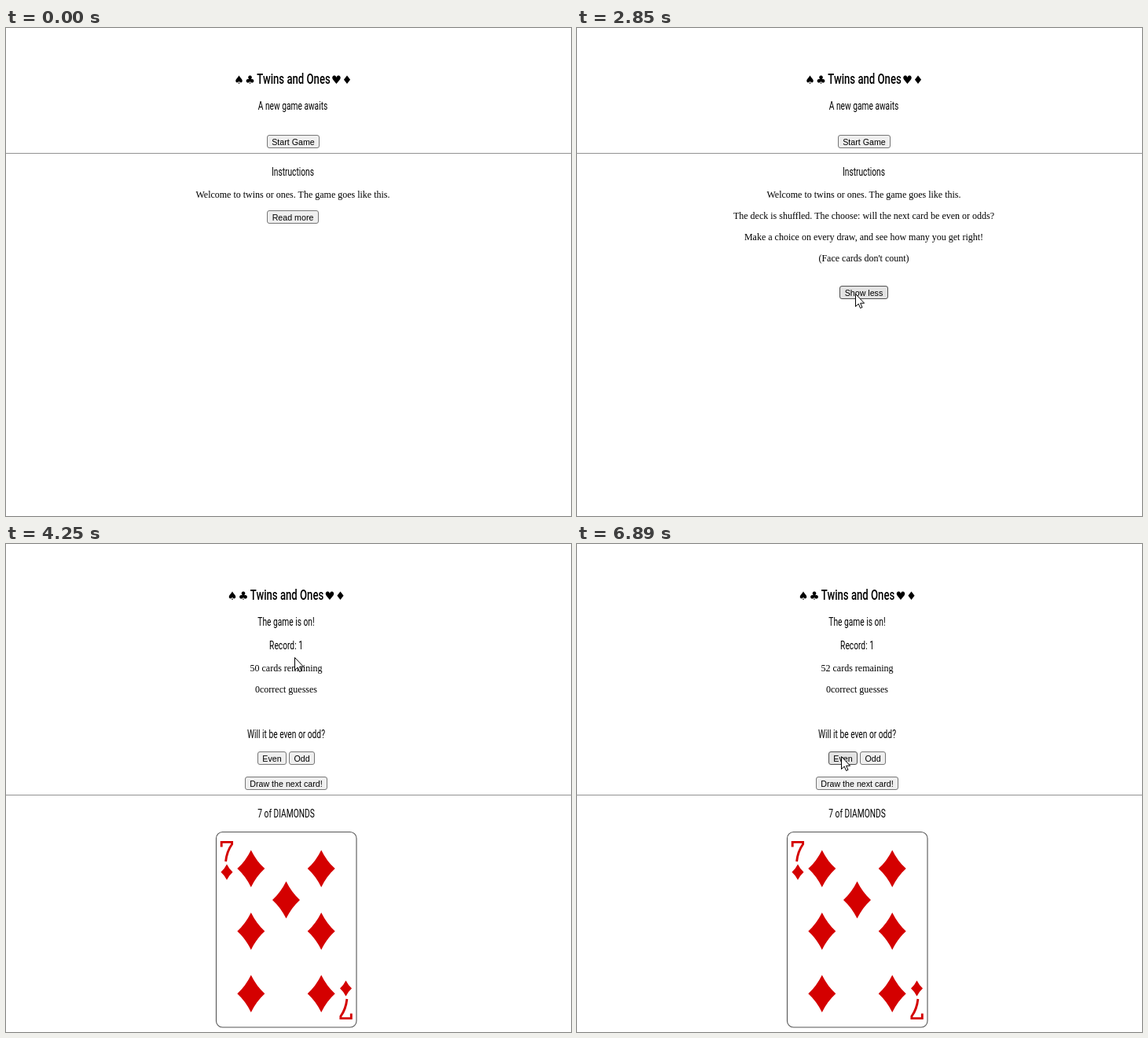
An HTML page that plays this animation: 719 by 621 pixels, repeating every 8 s.

```html
<!DOCTYPE html>
<html lang="en">
<head>
<meta charset="utf-8">
<title>Twins and Ones</title>
<style>
  html, body { margin: 0; width: 100%; height: 100%; overflow: hidden; background: #fff; }
  svg { display: block; width: 100%; height: 100%; }
  text { text-anchor: middle; }
  .head { font: 400 14px Roboto, sans-serif; }
  .big { font-size: 18px; font-weight: 500; }
  .suit { font: 14.5px "DejaVu Sans", sans-serif; }
  .body { font: 12px "Liberation Serif", serif; }
  .btn text { font: 10.67px "Liberation Sans", sans-serif; }
  .btn rect { fill: #efefef; stroke: #767676; }
  .btn.hover rect { fill: #e3e3e3; stroke: #4f4f4f; }
</style>
</head>
<body>
<svg id="stage" viewBox="0 0 719 621"></svg>
<script>
const LOOP = 8000, STEP = 77;
const RED = '#d40000';
const HOME_X = 365, GAME_X = 356.5;
const stage = document.getElementById('stage');
const pen = document.createElement('canvas').getContext('2d');
pen.font = '10.67px "Liberation Sans", sans-serif';

// Headings share one condensed look.
const head = (x, y, s, cls = '') =>
  `<text class="head ${cls}" transform="translate(${x} ${y}) scale(.73 1)">${s}</text>`;
const body = (x, y, s, id = '') => `<text class="body" id="${id}" x="${x}" y="${y}">${s}</text>`;
const suit = (x, s) => `<text class="suit" x="${x}" y="71">${s}</text>`;
const rule = y => `<rect y="${y}" width="719" height="1" fill="#929292"/>`;
const group = (id, s) => `<g id="${id}">${s}</g>`;

// Buttons fit their labels.
const buttons = {};
function button(id, cx, y, label) {
  const w = Math.round(pen.measureText(label).width) + 13;
  const x = Math.ceil(cx - w / 2);
  buttons[id] = { x, y, w };
  return `<g class="btn" id="${id}">
    <rect x="${x + .5}" y="${y + .5}" width="${w - 1}" height="16" rx="2.5"/>
    <text x="${x + w / 2}" y="${y + 12.7}">${label}</text></g>`;
}

const title = x => suit(x - 68.5, '♠') + suit(x - 54.5, '♣') +
  head(x + 1, 71, 'Twins and Ones', 'big') + suit(x + 55.5, '♥') + suit(x + 69, '♦');

const diamond = (x, y, w, h) =>
  `<path transform="translate(${x} ${y}) scale(${w} ${h})" fill="${RED}"
    d="M0-1Q.4-.4 1 0Q.4 .4 0 1Q-.4 .4-1 0Q-.4-.4 0-1Z"/>`;
const pip = (col, row) => diamond(GAME_X + col * 44.7, 492.7 + row * 79.6, 17.5, 23.7);
const corner = `<path d="M274.2 385.5V379.4H287.6V382Q281 391 279.6 404" fill="none"
  stroke="${RED}" stroke-width="2.9"/>` + diamond(281, 417.5, 7.5, 10);
const card = head(GAME_X, 348, '7 of DIAMONDS') +
  '<rect x="267.5" y="366.5" width="178.5" height="248.5" rx="8" fill="#fff" stroke="#555" stroke-width="1.1"/>' +
  [-1, 0, 1].map(row => pip(-1, row) + pip(1, row)).join('') + pip(0, -.5) +
  corner + `<g transform="rotate(180 356.75 491.5)">${corner}</g>`;

const details = [
  'The deck is shuffled. The choose: will the next card be even or odds?',
  'Make a choice on every draw, and see how many you get right!',
  "(Face cards don't count)"
].map((s, i) => body(HOME_X, 243 + 27 * i, s)).join('');

stage.innerHTML =
  group('home',
    title(HOME_X) + head(HOME_X, 104, 'A new game awaits') +
    button('start', HOME_X, 136, 'Start Game') + rule(159) +
    head(HOME_X, 188, 'Instructions') +
    body(HOME_X, 216, 'Welcome to twins or ones. The game goes like this.') +
    group('closed', button('more', HOME_X, 232, 'Read more')) +
    group('open', details + button('less', HOME_X, 328, 'Show less'))) +
  group('game',
    title(GAME_X) + head(GAME_X, 104, 'The game is on!') + head(GAME_X, 134, 'Record: 1') +
    body(GAME_X, 162, '', 'count') + body(GAME_X, 189, '0correct guesses') +
    head(GAME_X, 247, 'Will it be even or odd?') +
    button('even', GAME_X - 18, 264, 'Even') + button('odd', GAME_X + 20, 264, 'Odd') +
    button('draw', GAME_X, 296, 'Draw the next card!') + rule(319) + group('card', card)) +
  `<path id="cursor" d="M.5 .5V16.5L4.2 13L6.6 18.5L9 17.4L6.6 12.2H11.6Z"
    fill="#fff" stroke="#000" stroke-linejoin="round"/>`;

const el = id => document.getElementById(id);
// "inherit" keeps nested groups hidden with their page.
const show = (id, on) => el(id).setAttribute('visibility', on ? 'inherit' : 'hidden');
const ease = p => (p + p * p * (3 - 2 * p)) / 2;

// The pointer enters from the lower right and rests at each stop.
const entry = { x: 645, y: 540 };
const stops = [
  { from: 300, to: 910, x: 377, y: 146 },
  { from: 1060, to: 1450, x: 365, y: 239 },
  { from: 2240, to: 2540, x: 354, y: 345 },
  { from: 2710, to: 2850, x: 354, y: 338 },
  { from: 3248, to: 3400, x: 365, y: 174 },
  { from: 3480, to: 3640, x: 368, y: 148 },
  { from: 3790, to: 3870, x: 367, y: 144 },
  { from: 4800, to: 5180, x: 403, y: 309 },
  { from: 5257, to: 5640, x: 372, y: 304 },
  { from: 6280, to: 6890, x: 336, y: 270 }
];

function pointer(t) {
  const i = stops.filter(s => s.from <= t).length - 1;
  if (i < 0) return null;
  const a = stops[i - 1] || entry, b = stops[i];
  const span = b.to - b.from, gaps = Math.round(span / STEP);
  const done = Math.min(gaps, Math.floor((t - b.from) / span * gaps + 1e-6)) + 1;
  const p = ease(done / (gaps + 1));
  return { x: Math.round(a.x + (b.x - a.x) * p), y: Math.round(a.y + (b.y - a.y) * p) };
}

const inside = (pos, b) =>
  !!pos && pos.x >= b.x && pos.x <= b.x + b.w && pos.y >= b.y && pos.y <= b.y + 17;

function render(t) {
  const inGame = t >= 4100, open = t >= 1690 && t < 3170;
  show('home', !inGame);
  show('game', inGame);
  show('open', open);
  show('closed', !open);
  show('card', t >= 4180);
  el('count').textContent = (t < 4800 ? 50 : 52) + ' cards remaining';

  // Hover fades one step after the pointer leaves.
  const pos = pointer(t), last = pointer(t - STEP);
  show('cursor', !!pos);
  if (pos) el('cursor').setAttribute('transform', `translate(${pos.x} ${pos.y})`);
  for (const [id, b] of Object.entries(buttons)) {
    el(id).classList.toggle('hover', inside(pos, b) || inside(last, b));
  }
}

// "inherit" under a hidden page stays hidden, so pages need no extra checks.
const begin = performance.now();
function tick() {
  render((performance.now() - begin) % LOOP);
  requestAnimationFrame(tick);
}
render(0);
requestAnimationFrame(tick);
</script>
</body>
</html>
```
